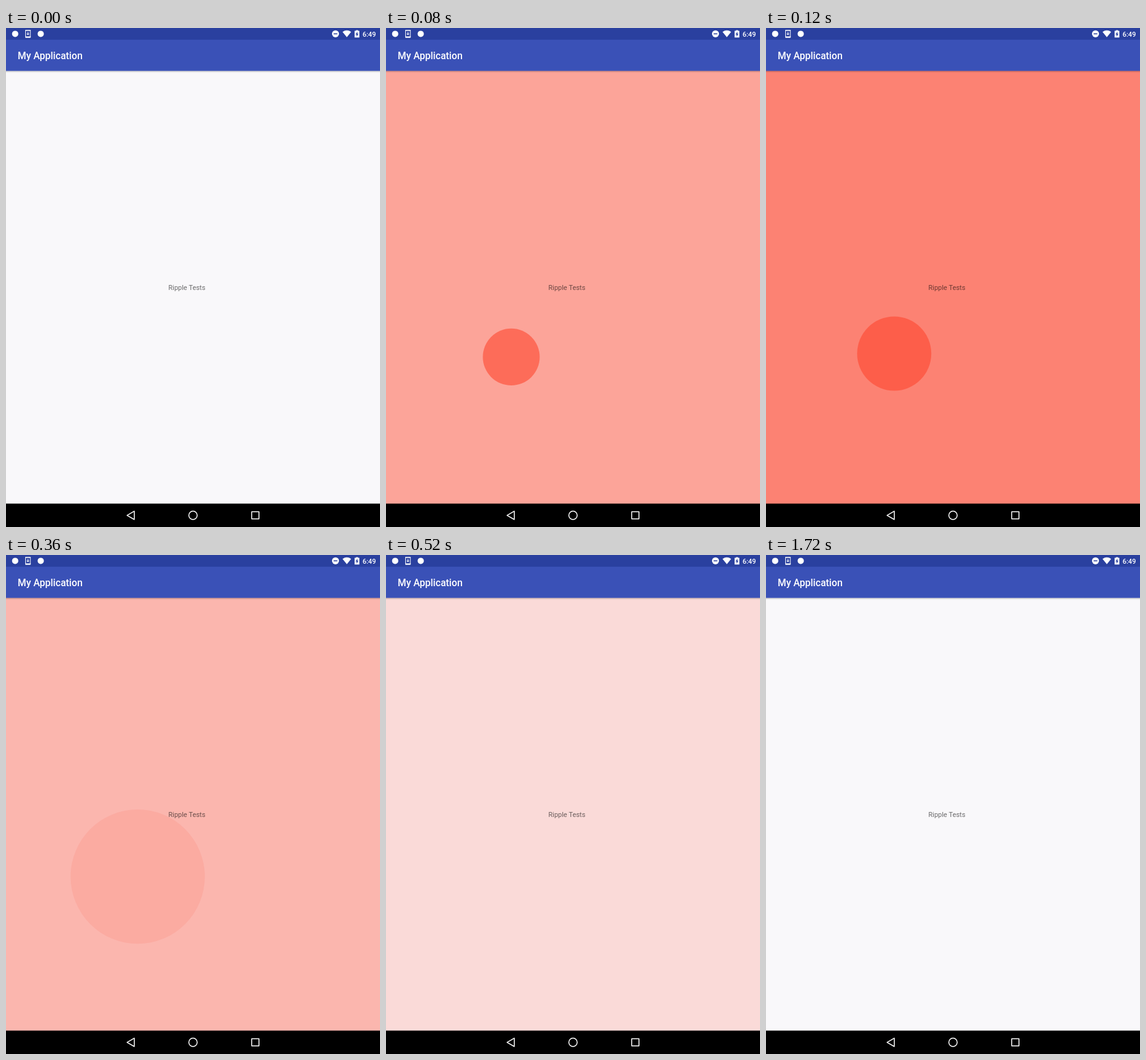
An HTML page for the animation above (1.76 s loop, 600x800 px).

```html
<!DOCTYPE html>
<html lang="en">
<head>
<meta charset="utf-8">
<title>Ripple</title>
<style>
  html, body { margin: 0; width: 100%; height: 100%; overflow: hidden; background: #f9f8fa; }
  svg { display: block; width: 600px; height: 800px; }
  text { font-family: Roboto, sans-serif; }
</style>
</head>
<body>
<svg viewBox="0 0 600 800">
  <defs>
    <linearGradient id="shade" x1="0" y1="0" x2="0" y2="1">
      <stop offset="0" stop-color="#000" stop-opacity=".3"/>
      <stop offset=".4" stop-color="#000" stop-opacity=".1"/>
      <stop offset="1" stop-color="#000" stop-opacity="0"/>
    </linearGradient>
  </defs>

  <rect width="600" height="800" fill="#f9f8fa"/>
  <g fill="#ff3d23">
    <rect id="wash" y="68" width="600" height="695" opacity="0"/>
    <circle id="spot" opacity="0"/>
  </g>
  <text x="260.5" y="420" font-size="10.94" fill="#000" fill-opacity=".57">Ripple Tests</text>

  <!-- app bar -->
  <rect y="68.75" width="600" height="3.2" fill="url(#shade)"/>
  <rect y="18" width="600" height="50.75" fill="#3a51b7"/>
  <rect width="600" height="18.75" fill="#2a409f"/>
  <text x="18.75" y="50" font-size="15.625" font-weight="500" fill="#fff">My Application</text>

  <!-- status icons -->
  <g fill="#fff">
    <circle cx="14.7" cy="9.4" r="5"/>
    <circle cx="55.7" cy="9.4" r="5"/>
    <path d="M31.4 3.6h7.6v11.4h-7.6z" fill="none" stroke="#fff" stroke-width="1"/>
    <path d="M31 3h8.4v1.6H31zM31 13.6h8.4v1.8H31zM34.7 6h1v3h1.8l-2.3 2.6-2.3-2.6h1.8z"/>
    <circle cx="528.6" cy="9.3" r="5.6"/>
    <rect x="525.6" y="8.6" width="6" height="1.5" fill="#2a409f"/>
    <path d="M546.8 14.8L539.9 6.2Q546.8 1.4 553.7 6.2Z"/>
    <path d="M559.3 4.6h2.2V3.4h3.2v1.2h2.2v10.6h-7.6z"/>
    <path d="M563.7 5.8v3.5h1.7l-2.9 4.8v-3.6h-1.7z" fill="#2a409f"/>
    <text x="572" y="13.6" font-size="10.94" font-weight="500">6:49</text>
  </g>

  <!-- navigation bar -->
  <rect y="762.5" width="600" height="37.5"/>
  <g fill="none" stroke="#fff" stroke-width="1.5" stroke-linejoin="round">
    <path d="M194.2 781.3L205.8 774.6V788Z"/>
    <circle cx="300" cy="781.3" r="6.7"/>
    <rect x="394.2" y="775.5" width="11.6" height="11.6"/>
  </g>
</svg>
<script>
const LOOP = 1760, STEP = 40;
const wash = document.getElementById('wash');
const spot = document.getElementById('spot');

function put(el, attrs) {
  for (const name in attrs) el.setAttribute(name, attrs[name]);
}

// Quick fade in, then a linear fade out
function washAlpha(t) {
  if (t < STEP) return 0;
  const rise = 0.9 - 1.204 * Math.pow(0.61, t / STEP);
  return Math.max(0, Math.min(rise, 0.353 * (650 - t) / 290));
}

function spotAlpha(t) {
  if (t < STEP) return 0;
  return Math.max(0, Math.min(0.57 - 0.0007 * (t - STEP), 0.00182 * (410 - t)));
}

function draw(time) {
  const t = Math.floor((time % LOOP) / STEP) * STEP;
  const k = Math.max(0, t / STEP - 1);
  // The spot drifts toward the middle and slows down
  const left = 0.57 * Math.pow(0.3, k) + 0.43 * Math.pow(0.72, k);
  put(wash, { opacity: washAlpha(t) });
  put(spot, {
    cx: 212 - 23 * left,
    cy: 514.8 + 26.2 * left,
    r: 138 - 78.5 * Math.pow(0.8535, k - 2) - 8.6 * Math.pow(0.05, k),
    opacity: spotAlpha(t)
  });
}

let start;
function tick(now) {
  if (start === undefined) start = now;
  draw(now - start);
  requestAnimationFrame(tick);
}
draw(0);
requestAnimationFrame(tick);
</script>
</body>
</html>
```
